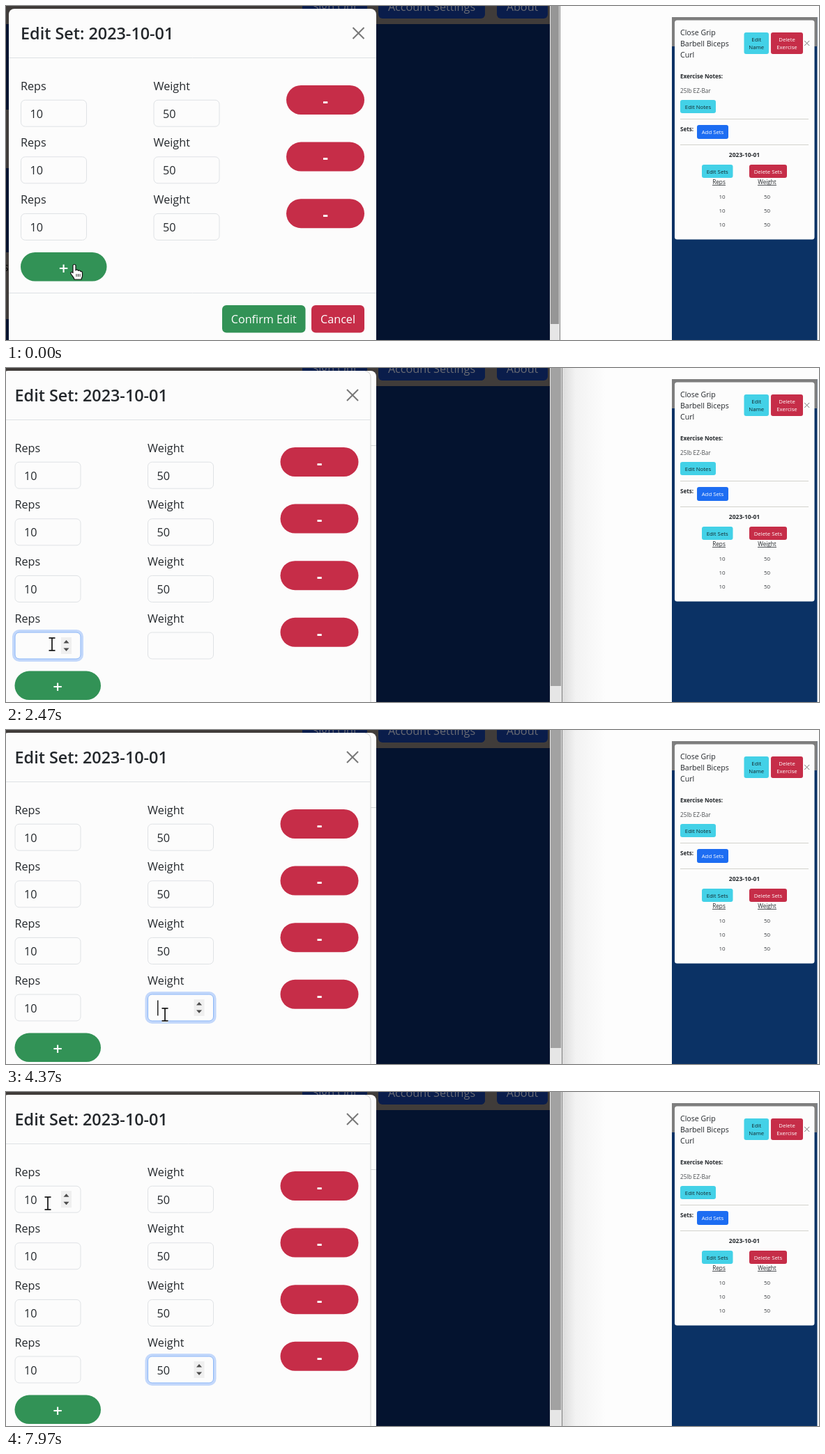
An HTML page with a canvas that plays this animation: 1166 px wide and 480 px high, repeating every 8 s.

```html
<!DOCTYPE html>
<html lang="en">
<head>
<meta charset="utf-8">
<title>Edit set dialog</title>
<style>
html, body { margin: 0; width: 100%; height: 100%; overflow: hidden; background: #fdfdfd; }
canvas { display: block; }
</style>
</head>
<body>
<canvas id="stage" width="1166" height="480"></canvas>
<script>
const ctx = document.getElementById('stage').getContext('2d');
const LOOP = 8000, BLINK = 530, PITCH = 81.6;
const FAMILY = '"Open Sans", "Noto Sans", sans-serif';
const RED = '#c62d48', GREEN = '#329256', CYAN = '#43d1e7', INK = '#24282c', PAPER = '#fcfcfc';

// Moments of the interaction, in ms
const WINDOW_FOCUS = 400, ADD_ROW = 1200;
const REPS_CLICK = 1900, REPS_KEYS = [2750, 3000];
const WEIGHT_CLICK = 4050, WEIGHT_KEYS = [4700, 5000];

// Pointer waypoints: time, x, y
const PATH = [
  [0, 98, 373], [1250, 98, 373], [1850, 66, 397], [3050, 66, 397],
  [3700, 226, 411], [3900, 226, 411], [4050, 228, 409],
  [6400, 228, 409], [7500, 60, 160], [LOOP, 60, 160]
];

const HAND = new Path2D('M-2 0C-2-2 2-2 2 0V7C3 5.5 5 5.5 5.5 7.5C7 6.5 8.5 7 9 8.5' +
  'C10.5 8 11.5 9 11.5 10.5V15C11.5 17 10 18 10 20H0C0 18-2 16-4.5 12.5C-6.5 10-4 8.5-2 10.5Z');
const ARROW = new Path2D('M0 0V16L4 12.5L6.5 18L9 17L6.5 11.5H11.5Z');

function box(x, y, w, h, r, fill, stroke, width = 1) {
  ctx.beginPath();
  ctx.roundRect(x, y, w, h, r);
  if (fill) { ctx.fillStyle = fill; ctx.fill(); }
  if (stroke) { ctx.strokeStyle = stroke; ctx.lineWidth = width; ctx.stroke(); }
}

function rect(x, y, w, h, fill) {
  ctx.fillStyle = fill;
  ctx.fillRect(x, y, w, h);
}

function line(x1, y1, x2, y2, color, width = 1) {
  ctx.beginPath();
  ctx.moveTo(x1, y1);
  ctx.lineTo(x2, y2);
  ctx.strokeStyle = color;
  ctx.lineWidth = width;
  ctx.stroke();
}

function text(str, x, y, size, color = INK, weight = 400, align = 'left') {
  ctx.font = `${weight} ${size}px ${FAMILY}`;
  ctx.fillStyle = color;
  ctx.textAlign = align;
  ctx.fillText(str, x, y);
}

function cross(x, y, r, width) {
  line(x - r, y - r, x + r, y + r, '#777', width);
  line(x - r, y + r, x + r, y - r, '#777', width);
}

function button(label, x, y, w, h, fill, size, color, r) {
  box(x, y, w, h, r, fill);
  const lines = label.split('\n'), step = size * 1.5;
  lines.forEach((s, i) => text(s, x + w / 2,
    y + h / 2 + size * 0.4 + (i - (lines.length - 1) / 2) * step, size, color, 400, 'center'));
}

function pointerAt(t) {
  const i = Math.max(1, PATH.findIndex(p => p[0] > t));
  const [t0, x0, y0] = PATH[i - 1], [t1, x1, y1] = PATH[i];
  const k = (t - t0) / (t1 - t0), e = k * k * (3 - 2 * k);
  return { x: x0 + (x1 - x0) * e, y: y0 + (y1 - y0) * e };
}

const inside = (p, x, y, w, h) => p.x >= x && p.x <= x + w && p.y >= y && p.y <= y + h;

function drawPage(t) {
  rect(0, 0, 1166, 480, '#fdfdfd');
  rect(0, 0, 780, 480, '#04132f');
  rect(0, 0, 780, 26, '#403c3a');
  rect(0, 149, 5, 84, '#403c3a');
  rect(0, 354, 5, 96, '#403c3a');
  text('s', -4, 381, 16, '#000');
  const nav = (label, x, w) => {
    box(x, -21, w, 39, 6, '#0a1d4b');
    text(label, x + w / 2, 6.5, 16.2, '#686a73', 400, 'center');
  };
  nav('Sign Out', 425, 93);
  nav('Account Settings', 534, 153);
  nav('About', 704, 73);

  // Window edge and scroll bar
  const active = t >= WINDOW_FOCUS, right = active ? 797 : 794;
  rect(780, 0, right - 780, 480, '#e6e6e6');
  rect(781, 0, right - 782, 457, active ? '#a2a2a2' : '#969696');
  if (active) {
    const g = ctx.createLinearGradient(798, 0, 860, 0);
    g.addColorStop(0, '#dcdcdc');
    g.addColorStop(0.3, '#f2f2f2');
    g.addColorStop(1, '#fdfdfd');
    rect(798, 0, 62, 480, g);
  }
  rect(right, 0, 1, 480, '#808080');
}

function drawPhone() {
  rect(955, 16, 208.5, 464, '#0b3265');
  rect(955, 16, 208.5, 42, '#7e7e7e');
  box(959, 20.5, 200.5, 315, 3.5, PAPER);
  ['Close Grip', 'Barbell Biceps', 'Curl'].forEach((s, i) =>
    text(s, 967, 41.5 + i * 16.2, 10.6, INK, 500));
  button('Edit\nName', 1058.5, 38, 35.5, 31, CYAN, 7.8, '#14262b', 3);
  button('Delete\nExercise', 1097, 38, 46, 31, RED, 7.8, '#fff', 3);
  cross(1148.7, 53.5, 3.5, 1);
  text('Exercise Notes:', 967, 104, 8.1, INK, 700);
  text('25lb EZ-Bar', 967, 124.5, 8.2, '#4c4f52');
  button('Edit Notes', 967, 135, 51, 19, CYAN, 7.8, '#14262b', 3);
  line(967, 162.5, 1151, 162.5, '#d3d3cd');
  text('Sets:', 967, 180, 8.1, INK, 700);
  button('Add Sets', 991, 171, 45, 20, '#1d6df2', 7.8, '#fff', 3);
  line(967, 199.5, 1151, 199.5, '#d3d3cd');
  text('2023-10-01', 1059, 217, 8.5, INK, 700, 'center');
  button('Edit Sets', 998, 228, 44.5, 19, CYAN, 7.8, '#14262b', 3);
  button('Delete Sets', 1066, 228, 54, 19, RED, 7.8, '#fff', 3);
  text('Reps', 1022.5, 256, 8.2, INK, 400, 'center');
  text('Weight', 1091.5, 256, 8.2, INK, 400, 'center');
  line(1013, 257.5, 1032, 257.5, INK, 0.8);
  line(1078, 257.5, 1105, 257.5, INK, 0.8);
  for (let i = 0; i < 3; i++) {
    const y = 276.5 + i * 20.2;
    text('10', 1027, y, 8, '#3a3d40', 400, 'center');
    text('50', 1091.5, y, 8, '#3a3d40', 400, 'center');
  }
}

function spinner(x, y) {
  rect(x - 8, y - 12, 15, 24, '#efefef');
  ctx.fillStyle = '#4c4c4c';
  for (const s of [-1, 1]) {
    ctx.beginPath();
    ctx.moveTo(x - 4.5, y + s * 3.5);
    ctx.lineTo(x + 3.5, y + s * 3.5);
    ctx.lineTo(x - 0.5, y + s * 8);
    ctx.fill();
  }
}

function drawField(label, value, x, y, focused, hovered, caret) {
  text(label, x, y - 14, 16.2);
  if (focused) box(x - 1.5, y - 1.5, 98, 42, 8, null, '#c3d8fb', 4);
  box(x + 0.5, y + 0.5, 94, 38, 6, PAPER, focused ? '#8ab6f7' : '#dfe2e5');
  text(value, x + 13.5, y + 26, 16.2);
  if (focused || hovered) spinner(x + 74.5, y + 19.5);
  if (caret) {
    ctx.font = `400 16.2px ${FAMILY}`;
    rect(Math.round(x + 13.5 + ctx.measureText(value).width), y + 9, 1.5, 22, '#222');
  }
}

function typed(word, times, t) {
  return word.slice(0, times.filter(k => t >= k).length);
}

// Returns the pointer style for what lies under it
function drawDialog(t, p) {
  const added = t >= ADD_ROW, rows = added ? 4 : 3, x = added ? 12.5 : 21;
  const drop = added ? PITCH : 0;
  const focus = t >= WEIGHT_CLICK ? 'Weight' : t >= REPS_CLICK ? 'Reps' : '';
  const last = Math.max(...[REPS_CLICK, ...REPS_KEYS, WEIGHT_CLICK, ...WEIGHT_KEYS].filter(k => k <= t));
  const blinkOn = focus && (t - last) % (2 * BLINK) < BLINK;
  let style = 'arrow';

  box(added ? -5 : 4, 4, added ? 536 : 527, 500, 8, PAPER);
  if (added) {
    rect(531, 0, 12, 480, '#04132f');
    rect(531, 0, 12, 26, '#403c3a');
    box(534, -21, 153, 39, 6, '#0a1d4b');
    text('Account Settings', 610.5, 6.5, 16.2, '#686a73', 400, 'center');
    ctx.beginPath();
    ctx.moveTo(515, 4.5);
    ctx.arcTo(523, 4.5, 523, 13, 8);
    ctx.lineTo(523, 480);
    ctx.strokeStyle = '#cfcfcf';
    ctx.lineWidth = 1;
    ctx.stroke();
    line(523, 111.5, 531, 111.5, '#d4d6d8');
  }
  text('Edit Set: 2023-10-01', x, 48, 23.4, INK, 600);
  cross(x + 484.5, 39, 8, 2);
  line(Math.max(0, x - 17), 74.5, x + 510, 74.5, '#dee1e4');

  for (let i = 0; i < rows; i++) {
    const y = 134.7 + i * PITCH, fresh = i === 3;
    const put = (label, fx, value) => {
      const hovered = inside(p, fx, y, 95, 39), focused = fresh && focus === label;
      if (hovered) style = 'beam';
      drawField(label, value, fx, y, focused, hovered, focused && blinkOn);
    };
    put('Reps', x, fresh ? typed('10', REPS_KEYS, t) : '10');
    put('Weight', x + 190.5, fresh ? typed('50', WEIGHT_KEYS, t) : '50');
    box(x + 381, y - 20.7, 112, 42, 21, RED);
    text('-', x + 437, y + 10, 24, '#fff', 700, 'center');
  }

  const plusY = 354 + drop;
  box(x, plusY, 123.5, 41.5, 20.7, GREEN);
  text('+', x + 61.5, plusY + 31.5, 24, '#fff', 600, 'center');
  if (inside(p, x, plusY, 123, 41)) style = 'hand';

  line(x - 17, 412.5 + drop, x + 510, 412.5 + drop, '#dee1e4');
  button('Confirm Edit', x + 289, 430 + drop, 119.5, 39.5, GREEN, 16.2, '#fff', 6);
  button('Cancel', x + 417, 430 + drop, 76, 39.5, RED, 16.2, '#fff', 6);
  return style;
}

function drawPointer(p, style) {
  ctx.save();
  ctx.translate(p.x, p.y);
  if (style === 'beam') {
    for (const [color, w] of [['#fff', 3.5], ['#111', 1.7]]) {
      line(0, -9, 0, 9, color, w);
      line(-4.5, -9, 4.5, -9, color, w);
      line(-4.5, 9, 4.5, 9, color, w);
    }
  } else {
    const shape = style === 'hand' ? HAND : ARROW;
    ctx.fillStyle = '#fff';
    ctx.strokeStyle = '#111';
    ctx.lineWidth = 1.2;
    ctx.lineJoin = 'round';
    ctx.fill(shape);
    ctx.stroke(shape);
    if (style === 'hand') for (const x of [3, 5.5, 8]) line(x, 12, x, 16, '#111', 0.9);
  }
  ctx.restore();
}

function frame(now) {
  const t = now % LOOP, p = pointerAt(t);
  drawPage(t);
  drawPhone();
  drawPointer(p, drawDialog(t, p));
  requestAnimationFrame(frame);
}
requestAnimationFrame(frame);
</script>
</body>
</html>
```
